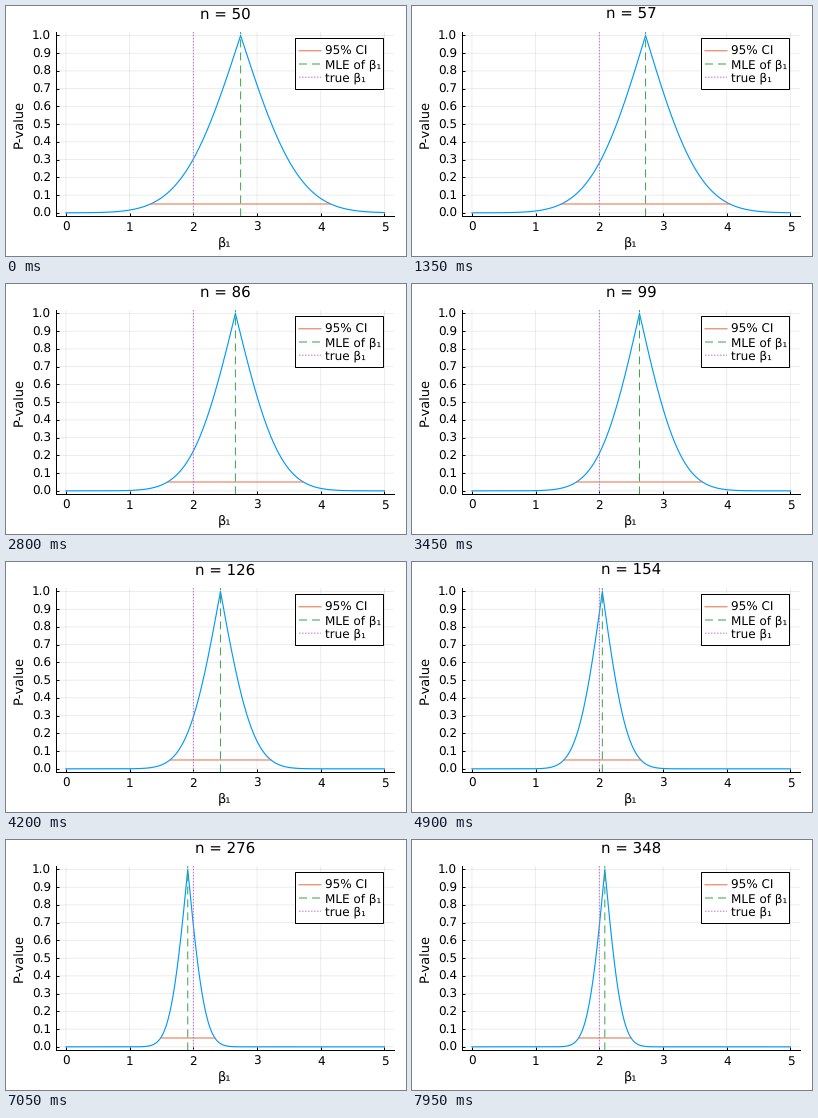
A matplotlib script for the animation above (8 s loop, 400 by 250 pixels).

```python
import math

import matplotlib.pyplot as plt
import numpy as np
from matplotlib.animation import FuncAnimation
from matplotlib.patches import Rectangle

W, H, DPI = 400, 250, 100
FRAMES, INTERVAL = 160, 50
BLUE, ORANGE, GREEN, PURPLE = "#009AFA", "#E26F46", "#3DA44D", "#C271D2"
PX = 72 / DPI  # points per pixel
LEFT, RIGHT, TOP, BOTTOM = 50.4, 388, 25.9, 210.4
DASH, DOT = (0, (8 * PX, 5 * PX)), (0, (1.5 * PX, 1.5 * PX))

plt.rcParams.update({"font.family": "DejaVu Sans", "text.hinting": "none",
                     "text.hinting_factor": 1, "lines.dash_capstyle": "butt",
                     "lines.scale_dashes": False})

# Estimate and scaled standard error as the sample grows
MLE_N = [50, 68, 73, 84, 99, 108, 134, 154, 170, 192, 276, 336, 348]
MLE = [2.742, 2.70, 2.691, 2.665, 2.63, 2.73, 2.29, 2.047, 1.96, 1.938, 1.912, 2.065, 2.086]
SE_N = [50, 73, 108, 154, 192, 276, 348]
SE_ROOT_N = [5.10, 5.07, 5.0, 3.83, 3.61, 3.61, 3.92]

fig = plt.figure(figsize=(W / DPI, H / DPI), dpi=DPI, facecolor="white")
ax = fig.add_axes([LEFT / W, 1 - BOTTOM / H, (RIGHT - LEFT) / W, (BOTTOM - TOP) / H])
ax.set(xlim=(-0.15, 5.15), ylim=(-0.02, 1.02), xticks=range(6),
       yticks=np.linspace(0, 1, 11))
ax.spines[["top", "right"]].set_visible(False)
for side in ("left", "bottom"):
    ax.spines[side].set_linewidth(PX)
ax.tick_params(direction="in", length=3 * PX, width=PX,
               labelbottom=False, labelleft=False)
ax.grid(color="black", alpha=0.1, linewidth=0.7 * PX, snap=False)
ax.set_axisbelow(True)

page = fig.add_axes([0, 0, 1, 1])
page.set(xlim=(0, W), ylim=(H, 0))
page.axis("off")


def label(x, y, text, px, ha="center", va="baseline", **kw):
    return page.text(x, y, text, fontsize=px * PX, ha=ha, va=va, **kw)


def px_line(color, style="-", width=1.0):
    return dict(color=color, linestyle=style, linewidth=width * PX, snap=False)


for i in range(6):
    label(60 + 63.7 * i, 225, str(i), 11.7)
for i in range(11):
    label(45, 211.2 - 17.75 * i, f"{i / 10:.1f}", 11.7, ha="right")
label(219, 241.3, "β₁", 13)
label(14.2, 117.8, "P-value", 13, va="center", rotation=90)
title = label(219.2, 13.2, "", 14.5)

page.add_patch(Rectangle((289, 32), 88, 51, facecolor="white",
                         edgecolor="black", linewidth=PX))
for y, text, color, style in [(44.8, "95% CI", ORANGE, "-"),
                              (58, "MLE of β₁", GREEN, DASH),
                              (71.2, "true β₁", PURPLE, DOT)]:
    page.plot([293, 315], [y, y], **px_line(color, style))
    label(318.7, y + 4.2, text, 11.7, ha="left")

grid = np.linspace(0, 5, 501)
curve, = ax.plot([], [], **px_line(BLUE, width=1.15))
interval, = ax.plot([], [], **px_line(ORANGE))
estimate = ax.axvline(2, **px_line(GREEN, DASH))
ax.axvline(2, **px_line(PURPLE, DOT))


def sample_size(frame):
    """Hold at 50, then grow by 1, 2 and 4 with a one-frame rest between."""
    if frame <= 70:
        return 50 + max(0, frame - 20)
    if frame <= 121:
        return 100 + 2 * (frame - 71)
    return 200 + 4 * (frame - 122)


def p_value(beta, mle, se):
    return [math.erfc(abs(b - mle) / (se * math.sqrt(2))) for b in beta]


def update(frame):
    n = sample_size(frame)
    mle = np.interp(n, MLE_N, MLE)
    se = np.interp(n, SE_N, SE_ROOT_N) / math.sqrt(n)
    beta = np.sort(np.append(grid, mle))
    curve.set_data(beta, p_value(beta, mle, se))
    interval.set_data([mle - 1.96 * se, mle + 1.96 * se], [0.05, 0.05])
    estimate.set_xdata([mle, mle])
    title.set_text(f"n = {n}")
    return curve, interval, estimate, title


anim = FuncAnimation(fig, update, frames=FRAMES, interval=INTERVAL,
                     repeat=True, repeat_delay=0)
plt.show()
```
